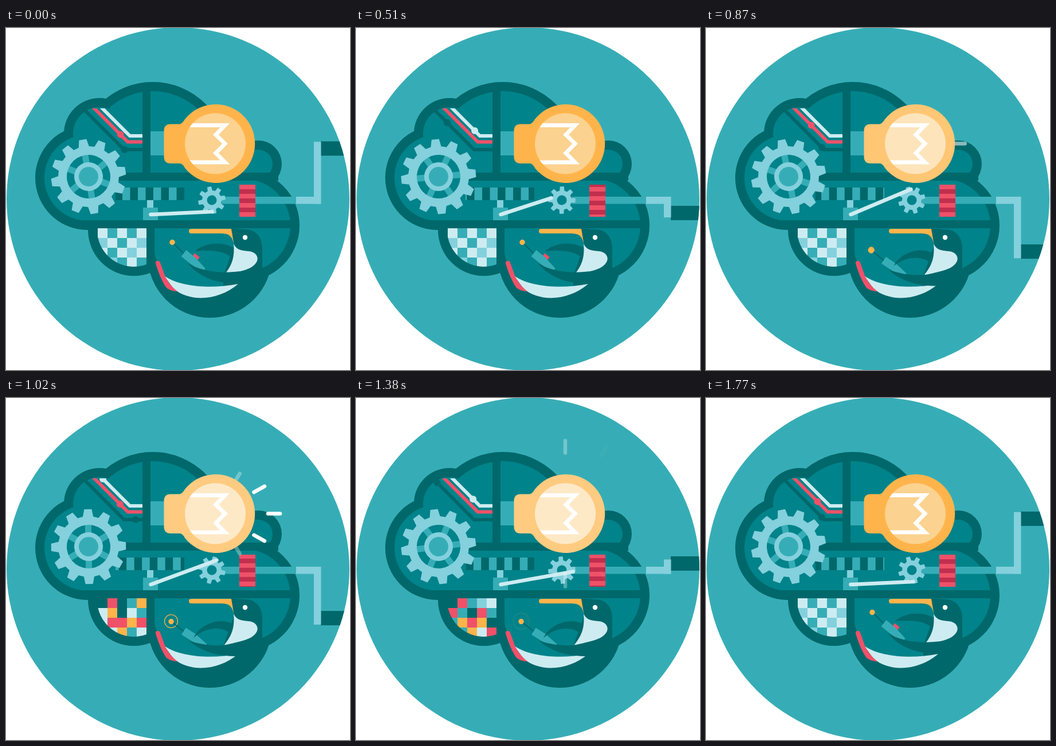
Write an HTML page that moves like this. It is 600 by 596 pixels and loops after 1.8 s.

```html
<!DOCTYPE html>
<html lang="en">
<head>
<meta charset="utf-8">
<title>Clockwork brain</title>
<style>
  html, body { margin: 0; width: 100%; height: 100%; overflow: hidden; background: #fff; }
  svg { display: block; width: 600px; height: 596px; }
  .bg { fill: #36adb6 } .dark { fill: #00686b } .mid { fill: #00838a }
  .sky { fill: #84d0dd } .ice { fill: #cdecf1 } .pink { fill: #ef5169 } .gold { fill: #ffb44b }
  .line { fill: none; stroke-width: 6 }
</style>
</head>
<body>
<svg viewBox="0 0 600 596">
  <defs>
    <clipPath id="disc"><circle cx="300" cy="298" r="299"/></clipPath>
    <clipPath id="upper"><rect width="600" height="335"/></clipPath>
    <clipPath id="lower"><rect x="440" y="349" width="80" height="90"/></clipPath>
    <clipPath id="pipeBox"><rect x="120" y="140" width="118" height="90"/></clipPath>
    <clipPath id="rackBox"><rect x="191" y="278" width="120" height="22"/></clipPath>
    <clipPath id="rollBox"><rect x="407" y="273" width="28" height="56"/></clipPath>
    <clipPath id="bowl"><path d="M159 349H245V412A64 64 0 0 1 159 349Z"/></clipPath>
    <clipPath id="glass"><circle cx="365" cy="201.5" r="53"/></clipPath>
  </defs>
  <circle class="bg" cx="300" cy="298" r="299"/>

  <g clip-path="url(#disc)">
    <g class="dark">
      <circle cx="142" cy="261" r="91"/><circle cx="163" cy="184" r="62"/>
      <circle cx="256" cy="224" r="130"/><circle cx="440" cy="237" r="41"/>
      <circle cx="415" cy="344" r="97"/><circle cx="355.500" cy="396.500" r="108.500"/>
      <circle cx="223" cy="352" r="80"/>
      <path d="M142 200H421V400H223V352H142Z"/>
    </g>
    <g class="mid" clip-path="url(#upper)">
      <circle cx="142" cy="261" r="75"/><circle cx="163" cy="184" r="46"/>
      <circle cx="256" cy="224" r="114"/><circle cx="440" cy="237" r="25"/>
      <circle cx="415" cy="344" r="81"/>
      <path d="M370 212H440V255H370ZM142 260H421V335H142Z"/>
    </g>
    <path class="mid" d="M259 349H447V430L405 447C360 455 310 455 277 433L263 405Q259 398 259 390Z"/>
    <circle class="mid" cx="415" cy="344" r="81" clip-path="url(#lower)"/>
    <path class="dark" d="M238 100H252V252H475V266H195V252H238Z"/>

    <g id="pipes" clip-path="url(#pipeBox)"></g>
    <g id="tiles" clip-path="url(#bowl)"></g>

    <g clip-path="url(#rackBox)">
      <rect class="dark" x="191" y="278" width="120" height="22"/>
      <g id="rack" class="bg"></g>
    </g>

    <g id="bigGear">
      <circle class="mid" r="42"/>
      <path id="spokes" stroke="#36adb6" stroke-width="11"/>
      <circle class="sky" r="25"/><circle class="bg" r="17"/>
      <path id="bigTeeth" class="sky" fill-rule="evenodd"/>
    </g>

    <rect id="handle" class="dark" x="549" width="60" height="25"/>
    <rect id="arm" class="sky" x="537" width="12.5"/>
    <rect class="sky" x="505" y="294" width="44" height="12.5"/>
    <rect class="bg" x="376" y="294" width="130" height="12.5"/>
    <g clip-path="url(#rollBox)">
      <rect class="pink" x="407" y="273" width="28" height="56"/>
      <g id="roll" fill="#c12f4e"></g>
    </g>
    <path id="smallGear" class="sky" fill-rule="evenodd"/>
    <rect class="sky" x="246" y="300" width="11" height="13"/>
    <rect class="bg" x="239" y="313" width="26" height="22"/>
    <line id="rod" x1="252.5" y1="325" stroke="#cdecf1" stroke-width="6.5" stroke-linecap="round"/>

    <path class="dark" d="M392 349L398 378L379 432V450H446L456 430L447 420V384C447 364 435 351 418 351Z"/>
    <path class="gold" d="M323 350H393L397.500 377C394 361 388 358 374 358H323A4 4 0 0 1 323 350Z"/>
    <g id="remote">
      <circle id="ring" cx="290" cy="373" fill="none" stroke="#ffb44b" stroke-width="1.300"/>
      <path d="M290 373L311 394" stroke="#00686b" stroke-width="2"/>
      <circle class="gold" cx="290" cy="373.500" r="4.700"/>
      <g transform="translate(310 392.500) rotate(39)">
        <rect id="button" class="pink" x="15" width="11"/>
        <path class="bg" d="M0 -7H20L46 -3V5L20 7H0Z"/>
      </g>
    </g>
    <path id="wing" class="dark"/>
    <path class="ice" d="M397 376C402 387 411 388 423 389C437 390 444 402 434 412C426 421 410 424 380 431C395 413 399 399 397 376Z"/>
    <path class="ice" d="M276 432C305 452 360 455 405 446C370 476 320 478 292 454Z"/>
    <path id="flipper" class="dark"/>
    <path class="pink" d="M261 410C260 405 267 404 269 409L278 434Q286 449 299 459Q289 459 280 453C271 440 265 424 261 410Z"/>
    <ellipse id="eye" cx="417" cy="365" rx="4.200" fill="#fff"/>

    <g id="rays" stroke="#fff" stroke-width="6.500" stroke-linecap="round"></g>
    <rect class="bg" x="252" y="180" width="24" height="42"/>
    <path id="bulb" d="M287 167.500H303Q308 166 312 159A68.500 68.500 0 1 1 312 244Q308 236 303 236H287Q275.500 236 275.500 224V179.500Q275.500 167.500 287 167.500Z"/>
    <circle id="core" cx="365" cy="201.500" r="53"/>
    <path clip-path="url(#glass)" d="M310 169.500H382L366 186L382 201.500L366 218L382 234H310" fill="none" stroke="#fff" stroke-width="7"/>
  </g>
</svg>
<script>
const LOOP = 1800, STEP = 30;
const $ = id => document.getElementById(id);
const rad = deg => deg * Math.PI / 180;
const clamp = x => Math.max(0, Math.min(1, x));
const ease = x => x < .5 ? 2 * x * x : 1 - 2 * (1 - x) ** 2;
const ramp = (t, a, b) => ease(clamp((t - a) / (b - a)));
const pulse = (t, a, b, c, d) => ramp(t, a, b) - ramp(t, c, d);
const mod = (a, n) => (a % n + n) % n;

function set(node, attrs) {
  for (const k in attrs) node.setAttribute(k, attrs[k]);
  return node;
}
function add(parent, tag, attrs) {
  const node = document.createElementNS('http://www.w3.org/2000/svg', tag);
  return parent.appendChild(set(node, attrs));
}
function mix(a, b, p) {
  return `rgb(${a.map((v, i) => Math.round(v + (b[i] - v) * p))})`;
}

function gear(count, root, tip, hole, wide, narrow) {
  const pitch = 360 / count, pts = [];
  for (let i = 0; i < count; i++) {
    for (const [r, off] of [[root, -wide], [tip, -narrow], [tip, narrow], [root, wide]]) {
      const a = rad(i * pitch + off * pitch - 90);
      pts.push((r * Math.cos(a)).toFixed(2) + ' ' + (r * Math.sin(a)).toFixed(2));
    }
  }
  return `M${pts.join('L')}ZM${hole} 0A${hole} ${hole} 0 1 0 ${-hole} 0A${hole} ${hole} 0 1 0 ${hole} 0Z`;
}
set($('bigTeeth'), { d: gear(12, 53, 65.5, 38, .33, .19) });
set($('smallGear'), { d: gear(8, 17, 24, 8.5, .31, .19) });
set($('spokes'), { d: [0, 60, 120].map(a => {
  const x = 40 * Math.sin(rad(a)), y = 40 * Math.cos(rad(a));
  return `M${x} ${-y}L${-x} ${y}`;
}).join('') });

for (let i = -1; i < 6; i++) add($('rack'), 'rect', { x: 176 + i * 27, y: 278, width: 13.5, height: 22 });
for (let i = -1; i < 5; i++) add($('roll'), 'rect', { x: 407, y: 265 + i * 16, width: 28, height: 8 });

// Pipes: start, bend, end; each bead run is [start time, duration].
const pipes = [
  { color: '#00686b', x: 141, y: 147, bend: 65, runs: [[1375, 570], [360, 730]] },
  { color: '#ef5169', x: 155, y: 141, bend: 57.5, runs: [[1545, 430], [590, 740]] },
  { color: '#cdecf1', x: 168, y: 140, bend: 48, runs: [[110, 650], [1010, 650]] }
];
for (const p of pipes) {
  add($('pipes'), 'path', {
    class: 'line', stroke: p.color,
    d: `M${p.x - 8} ${p.y - 8}l${p.bend + 8} ${p.bend + 8}H240`
  });
  p.beads = p.runs.map(() => add($('pipes'), 'circle', { r: 6, fill: p.color }));
}
function moveBeads(p, t) {
  const slope = p.bend * Math.SQRT2, total = slope + 238 - p.x - p.bend;
  p.runs.forEach(([start, dur], i) => {
    const u = mod(t - start, LOOP) / dur, s = u * total;
    const down = Math.min(s, slope) / Math.SQRT2;
    set(p.beads[i], {
      cx: p.x + down + Math.max(0, s - slope), cy: p.y + down,
      visibility: u <= 1 ? 'visible' : 'hidden'
    });
  });
}

const paint = { W: '#cdecf1', L: '#84d0dd', T: '#36adb6', D: '#00686b', P: '#ef5169', O: '#ffb44b' };
const boards = {
  calm: 'WTWTWLWTWLWTWLWTLTWT',
  first: 'DPDTOWODWTWPPOPPWOTW',
  second: 'PDTWOOPWTPWOPWTTWDPW',
  third: 'DPTLWPTDPTTOPODPTOWP'
};
const tiles = [...boards.calm].map((c, i) => add($('tiles'), 'rect', {
  x: 160 + i % 5 * 17, y: 349 + Math.floor(i / 5) * 17, width: 17.3, height: 17.3
}));

const rays = [-90, -58.5, -29, 0, 29, 58.5, 90].map(angle => ({
  angle, lag: Math.abs(angle) * 3,
  node: add($('rays'), 'line', { x1: -10.5, x2: 10.5, y1: 0, y2: 0 })
}));
function moveRay(r, t) {
  const age = t - 810 - r.lag;
  const dist = 64.5 + .2 * age - .00009 * age * age;
  const fade = clamp(age / 110) * clamp((450 - age) / 240) ** 2.5;
  set(r.node, {
    transform: `translate(365 201.5) rotate(${r.angle}) translate(${dist} 0)`,
    opacity: age > 0 ? fade : 0
  });
}

// Limbs: raised and lowered poses, as cubic control points.
const poses = {
  wing: [
    [330, 389, 345, 374, 378, 371, 399, 384, 399, 390, 399, 398, 398, 406, 388, 389, 362, 386, 330, 389],
    [327, 418, 340, 392, 375, 382, 396, 394, 396, 400, 395, 408, 393, 412, 380, 399, 352, 396, 327, 418]
  ],
  flipper: [
    [317, 410, 335, 421, 365, 428, 397, 425, 430, 424, 450, 410, 450, 440, 400, 449, 352, 450, 317, 410],
    [319, 423, 342, 430, 362, 433, 386, 430, 425, 424, 450, 410, 450, 446, 400, 454, 352, 452, 319, 423]
  ]
};
function bend(id, p) {
  const [a, b] = poses[id];
  const n = a.map((v, i) => (v + (b[i] - v) * p).toFixed(2));
  set($(id), { d: `M${n.slice(0, 2)}C${n.slice(2)}Z` });
}

function draw(t) {
  const turn = t / LOOP;

  const crank = pulse(t, 0, 900, 900, 1800);
  const swing = -90 + 180 * crank;
  const end = 300 + swing * 1.06 + Math.sign(swing) * 6.3;
  set($('handle'), { y: 300 + swing - 12.5 });
  set($('arm'), { y: Math.min(294, end), height: Math.max(306.5, end) - Math.min(294, end) });
  set($('roll'), { transform: `translate(0 ${mod(32 * crank, 16)})` });

  set($('bigGear'), { transform: `translate(144 259) rotate(${-9 + 120 * turn})` });
  set($('smallGear'), { transform: `translate(359 300) rotate(${34 + 360 * turn})` });
  const pin = rad(90 + 360 * turn);
  set($('rod'), { x2: 359.5 + 19.5 * Math.cos(pin), y2: 300.5 + 19.5 * Math.sin(pin) });
  set($('rack'), { transform: `translate(${mod(108 * turn, 27)} 0)` });
  pipes.forEach(p => moveBeads(p, t));

  const lower = pulse(t, 780, 900, 1590, 1740);
  const press = pulse(t, 780, 870, 1470, 1590);
  set($('remote'), {
    transform: `translate(${-2 * lower} ${16 * lower}) rotate(${-6 * lower} 290 373)`
  });
  set($('button'), { y: -12 + 6 * press, height: 7 });
  bend('wing', lower);
  bend('flipper', lower);
  set($('ring'), {
    r: 5 + 9 * clamp((t - 870) / 210),
    opacity: t < 870 ? 0 : clamp((1440 - t) / 400)
  });
  set($('eye'), { ry: 4.2 * Math.max(.12, clamp(Math.abs(t - 330) / 90)) });

  const lit = pulse(t, 810, 900, 1620, 1710);
  set($('bulb'), { fill: mix([255, 180, 75], [255, 203, 128], lit) });
  set($('core'), { fill: mix([251, 210, 143], [254, 233, 199], lit) });
  rays.forEach(r => moveRay(r, t));

  const board = t < 900 || t >= 1650 ? 'calm' : t < 1140 ? 'first' : t < 1380 ? 'second' : 'third';
  tiles.forEach((tile, i) => set(tile, { fill: paint[boards[board][i]] }));
}

function tick() {
  draw(Math.floor(performance.now() % LOOP / STEP) * STEP);
  requestAnimationFrame(tick);
}
tick();
</script>
</body>
</html>
```
